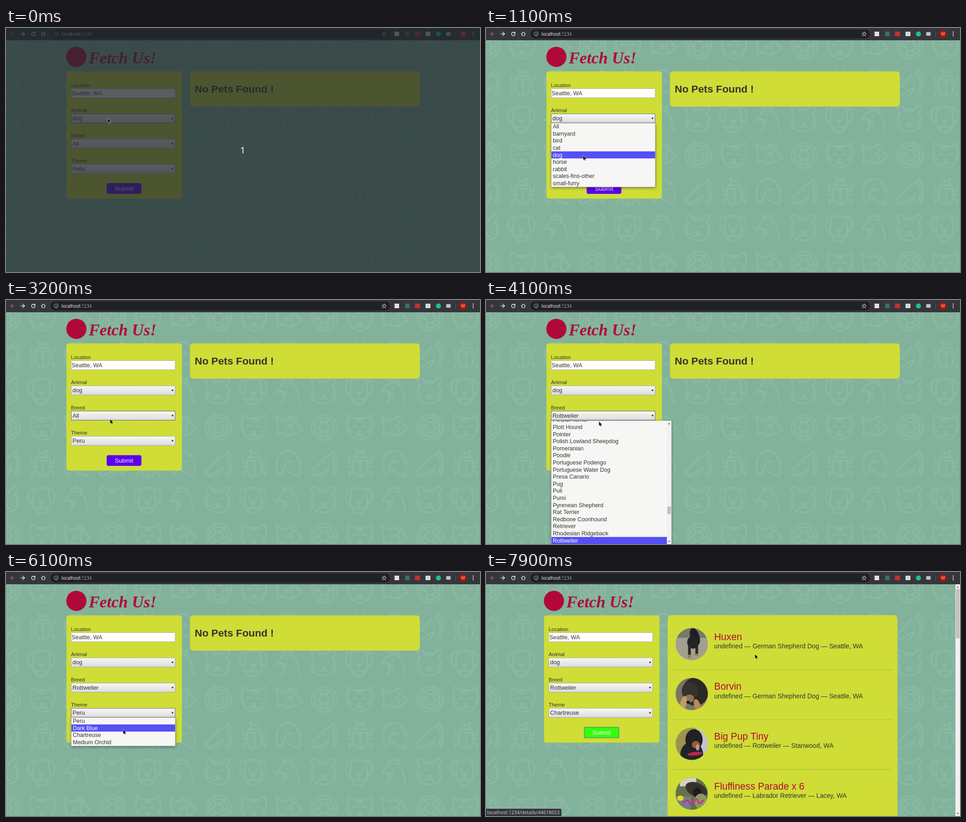
An HTML page with a canvas for the animation above (8000 ms loop, 1043 by 537 pixels).

```html
<!DOCTYPE html>
<html lang="en">
<head>
<meta charset="utf-8">
<title>Pet search</title>
<style>
html, body { margin: 0; width: 100%; height: 100%; overflow: hidden; background: #82b29b; }
canvas { display: block; width: 100vw; height: 100vh; }
</style>
</head>
<body>
<canvas id="stage"></canvas>
<script>
const W = 1043, H = 537, LOOP = 8000, STEP = 100, ROW = 15.6;
const SANS = '"Liberation Sans", Arial, sans-serif';
const UI = '"Noto Sans", "Open Sans", sans-serif';
const INK = '#333', LIME = '#cfdd36', CRIMSON = '#b20838', PICK = '#5450f5';

const canvas = document.getElementById('stage');
const dpr = window.devicePixelRatio || 1;
canvas.width = W * dpr;
canvas.height = H * dpr;
let c = canvas.getContext('2d');

function rect(x, y, w, h, fill, r = 0) {
  c.beginPath();
  c.roundRect(x, y, w, h, r);
  c.fillStyle = fill;
  c.fill();
}

function disc(x, y, r, fill) {
  c.beginPath();
  c.arc(x, y, r, 0, 7);
  c.fillStyle = fill;
  c.fill();
}

function oval(x, y, rx, ry, fill, turn = 0) {
  c.beginPath();
  c.ellipse(x, y, rx, ry, turn, 0, 7);
  c.fillStyle = fill;
  c.fill();
}

function frame(x, y, w, h, color, lw = 1) {
  c.strokeStyle = color;
  c.lineWidth = lw;
  c.strokeRect(x, y, w, h);
}

function line(d, color, lw, x = 0, y = 0) {
  c.save();
  c.translate(x, y);
  c.strokeStyle = color;
  c.lineWidth = lw;
  c.lineCap = c.lineJoin = 'round';
  c.stroke(new Path2D(d));
  c.restore();
}

function shape(d, fill, x = 0, y = 0) {
  c.save();
  c.translate(x, y);
  c.fillStyle = fill;
  c.fill(new Path2D(d));
  c.restore();
}

function text(s, x, y, size, color = INK, opt = {}) {
  c.font = `${opt.style || ''} ${size}px ${opt.font || SANS}`;
  c.textAlign = opt.align || 'left';
  c.fillStyle = color;
  c.fillText(s, x, y);
}

// Wallpaper: three rows of three line icons, repeated.
const ring = r => `M${r} 0A${r} ${r} 0 1 1 ${-r} 0A${r} ${r} 0 1 1 ${r} 0`;
const spokes = Array.from({ length: 6 }, (_, i) => {
  const p = (a, r) => `${r * Math.cos(a)} ${r * Math.sin(a)}`;
  const a = i * Math.PI / 3;
  return `M${p(a, 12)}L${p(a + Math.PI / 3, 12)}M${p(a, 12)}L${p(a, 21)}`;
}).join('');
const ICONS = [
  [2, 40, ring(28) + ring(21) + spokes],
  [80, 40, 'M-25-27L-12-19Q0-22 12-19L25-27Q28-8 26 6Q20 26 0 28Q-20 26-26 6Q-28-8-25-27ZM-14-2q4-4 8 0M6-2q4-4 8 0M-4 10h8l-4 5zM0 15q-5 7-10 2M0 15q5 7 10 2M-5-19v7M0-20v9M5-19v7M-26 8h8M26 8h-8'],
  [157, 40, 'M-29-24L-12-14Q8-26 28 4Q8 26-16 12L-26 18Q-22 4-29-24ZM10-14Q4 2 10 16M-8-2q5 4 0 8M0-6q5 4 0 8M18-1h1M-4-18Q6-30 16-16'],
  [2, 120, 'M20-28Q36 0 22 28M20-28L12-18Q-4-14-16 6L-28 16Q-30 24-22 28L-6 20Q4 14 10 10Q4 26-8 30M-2-4h2M18-16Q28 4 16 24'],
  [81, 120, 'M-16-8Q-16-14 0-14Q16-14 16-8L16 10Q14 28 0 29Q-14 28-16 10ZM0-6V28M-16-6H16M-10-14Q-8-24 0-24Q8-24 10-14M-5-23L-10-30M5-23L10-30M-16 0L-25-4V-14M16 0L25-4V-14M-16 8H-26M16 8H26M-14 16L-24 20V28M14 16L24 20V28'],
  [157, 120, 'M22 28Q34-8 8-26Q-20-34-27-4Q-30 14-22 26Q-14 24-12 8Q0 22 22 28ZM-12 8Q-6-8 8-4M-6-14h1'],
  [0, 200, 'M-20-14Q-30-20-24-28Q-14-30-10-20Q0-24 10-20Q14-30 24-28Q30-20 20-14Q32 8 22 20Q0 36-22 20Q-32 8-20-14ZM-10-4h1M10-4h1M-4 8h8l-4 5zM0 13q-6 8-10 2M0 13q6 8 10 2M-27 6h8M27 6h-8M-26 13h7M26 13h-7M0-21v8M-6-20v5M6-20v5'],
  [78, 200, 'M-14-24Q0-30 14-24L26-22Q32-6 26 6L18 4Q22 16 14 20Q10 30 0 30Q-10 30-14 20Q-22 16-18 4L-26 6Q-32-6-26-22ZM-18 4Q-20-10-14-24M18 4Q20-10 14-24M-8-6h1M8-6h1M-5 4h10l-5 6zM0 10v6q-8 6-12 0M0 16q8 6 12 0'],
  [154, 200, 'M-14 28Q-2 10-12 0L-26 4L-14-12Q-8-20 4-18Q22-14 26 28M-8-18L-12-26L-4-24L0-30L5-24L12-28L12-16M-2-8h1M-12 2q0 12 6 12q6-2 2-12']
];

function wallpaper() {
  rect(0, 0, W, H, '#82b29b');
  for (const [x, y, d] of ICONS)
    for (let i = 0; i < 5; i++)
      for (let j = 0; j < 3; j++) line(d, '#8ab8a2', 4, x + i * 232.8, y + j * 240);
}

function browserBar() {
  rect(0, 0, W, 27, '#35363a');
  rect(98, 3, 747, 20, '#202124', 10);
  const arrow = 'M4 0H-4M0-4L-4 0L0 4';
  line(arrow, '#74767a', 1.3, 14, 13);
  line('M-4 0H4M0-4L4 0L0 4', '#e8eaed', 1.3, 37, 13);
  line('M3-2.5A4 4 0 1 0 4 1', '#e8eaed', 1.3, 60, 13);
  shape('M4.5-5V-.5H0Z', '#e8eaed', 60, 13);
  line('M-4.500 0L0-4L4.500 0M-3-1V4H3V-1', '#e8eaed', 1.2, 82, 13);
  line(ring(4.4), '#c6c8cb', 1, 110.5, 13);
  line('M0-2v.1M0 0v2.200', '#c6c8cb', 1.1, 110.5, 13);
  text('localhost', 122, 16.700, 9.9, '#f1f3f4', { font: UI });
  text(':1234', 163.5, 16.700, 9.9, '#9aa0a6', { font: UI });
  line('M0-4.700L1.400-1.500L4.800-1.200L2.200 1L3 4.400L0 2.600L-3 4.400L-2.200 1L-4.800-1.200L-1.400-1.500Z', '#dadce0', 1, 832, 13);
  rect(855, 8, 10, 10, '#e9e2dc');
  rect(878, 8, 10, 10, '#3d6f66');
  rect(900, 8, 11, 10, '#c9302c');
  rect(923, 8, 11, 10, '#d5d7d8', 1.5);
  disc(951.5, 13, 5.5, '#15c39a');
  rect(968.5, 9, 10, 8, '#bcc0c4', 1.5);
  rect(989, 7, 1, 12, '#5f6368');
  disc(1005.5, 13, 7.8, '#c01208');
  text('M', 1005.5, 16.200, 8.5, '#f6dcda', { font: UI, align: 'center' });
  for (const y of [9, 13, 17]) disc(1028, y, 1.2, '#e8eaed');
}

// The wallpaper and the bar never change, so they are drawn once.
const backdrop = document.createElement('canvas');
backdrop.width = canvas.width;
backdrop.height = canvas.height;
const main = c;
c = backdrop.getContext('2d');
c.scale(dpr, dpr);
wallpaper();
browserBar();
c = main;

const ANIMALS = ['All', 'barnyard', 'bird', 'cat', 'dog', 'horse', 'rabbit', 'scales-fins-other', 'small-furry'];
const THEMES = ['Peru', 'Dark Blue', 'Chartreuse', 'Medium Orchid'];
const FIRST = ['All', 'Affenpinscher', 'Afghan Hound', 'Airedale Terrier', 'Akbash', 'Akita', 'Alaskan Malamute',
  'American Bulldog', 'American Bully', 'American Eskimo Dog', 'American Foxhound', 'American Hairless Terrier',
  'American Staffordshire Terrier', 'American Water Spaniel', 'Anatolian Shepherd', 'Appenzell Mountain Dog',
  'Aussiedoodle', 'Australian Cattle Dog'];
const LATER = ['Pekingese', 'Peruvian Inca Orchid', 'Petit Basset Griffon Vendeen', 'Pharaoh Hound',
  'Pit Bull Terrier', 'Plott Hound', 'Pointer', 'Polish Lowland Sheepdog', 'Pomeranian', 'Poodle',
  'Portuguese Podengo', 'Portuguese Water Dog', 'Presa Canario', 'Pug', 'Puli', 'Pumi', 'Pyrenean Shepherd',
  'Rat Terrier', 'Redbone Coonhound', 'Retriever', 'Rhodesian Ridgeback', 'Rottweiler'];
const PETS = [
  ['Huxen', 'German Shepherd Dog — Seattle, WA'],
  ['Borvin', 'German Shepherd Dog — Seattle, WA'],
  ['Big Pup Tiny', 'Rottweiler — Stanwood, WA'],
  ['Fluffiness Parade x 6', 'Labrador Retriever — Lacey, WA']
];

// time, x, y of the pointer tip
const PATH = [
  [0, 224, 199], [100, 226.5, 197], [600, 226.5, 197], [700, 220, 240], [800, 215, 291], [900, 215, 291],
  [1000, 214, 285], [1100, 214, 281], [1400, 214, 281], [1500, 216, 277], [1900, 228, 264], [2200, 228, 264],
  [2300, 228.5, 263.5], [3100, 228.5, 263.5], [3200, 229.3, 262.5], [3700, 229.3, 262.5], [4100, 248.7, 267.5],
  [5300, 248.7, 267.5], [5600, 256, 305], [5800, 257, 312], [6100, 257.8, 347], [6200, 259, 356],
  [6900, 259, 356], [7000, 268, 348], [7100, 268, 348], [7200, 400, 318], [7300, 521, 283], [7400, 521, 283], [7900, 592, 181]
];

function pointerAt(t) {
  const i = PATH.findIndex(k => k[0] > t);
  if (i < 0) return PATH[PATH.length - 1].slice(1);
  const [t0, x0, y0] = PATH[i - 1], [t1, x1, y1] = PATH[i];
  const k = (t - t0) / (t1 - t0);
  return [x0 + (x1 - x0) * k, y0 + (y1 - y0) * k];
}

const within = (t, a, b) => t >= a && t < b;

function pointer(x, y) {
  const d = 'M0 0V9.500L2.200 7.500L3.800 10.800L5.300 10.100L3.800 7H6.700Z';
  line(d, 'rgba(255,255,255,.75)', 1.2, x, y);
  shape(d, '#111', x, y);
}

function select(label, value, y, dark) {
  text(label, 143, y - 3.5, 11.5);
  const g = c.createLinearGradient(0, y, 0, y + 21);
  g.addColorStop(0, '#f8f8f8');
  g.addColorStop(1, '#dcdcdc');
  rect(143, y, 229.5, 21, g);
  frame(143.5, y + .5, 228.5, 20, dark ? '#66666e' : '#a5a69b');
  text(value, 146.3, y + 14.600, 12.9);
  shape('M-2.400-1.600H2.400L0 2.200Z', '#222', 366.3, y + 10.5);
}

function button(green, focused) {
  rect(221.5, 341.5, 76.5, 23.5, green ? '#36ff0a' : '#5c00f0', focused ? 0 : 4);
  if (focused) frame(221.7, 341.7, 76, 23.2, '#5b8792', 1.3);
  text('Submit', 259.8, 357.5, 13, '#f3efff', { align: 'center' });
}

function popup(items, top, x1, bottom, picked, firstY = top) {
  c.save();
  c.shadowColor = 'rgba(0,0,0,.45)';
  c.shadowBlur = 6 * dpr;
  c.shadowOffsetY = 2 * dpr;
  rect(143.5, top, x1 - 143.5, bottom - top, '#f6f6f4');
  c.restore();
  c.save();
  c.beginPath();
  c.rect(143.5, top, x1 - 143.5, bottom - top);
  c.clip();
  items.forEach((s, i) => {
    const y = firstY + i * ROW;
    if (i === picked) rect(144, y, x1 - 144, ROW, PICK);
    text(s, 147, y + 12.1, 12.5, i === picked ? '#fff' : INK);
  });
  c.restore();
  frame(143.5, top + .5, x1 - 143.5, bottom - top - .5, '#a2a3a0', .8);
}

function scrollbar(x, top, bottom, thumbY, thumbH) {
  rect(x, top, 10, bottom - top, '#f1f1f1');
  rect(x + 1, thumbY, 8, thumbH, '#c1c1c1');
  shape('M-2.500 1.300H2.500L0-1.500Z', '#555', x + 5, top + 6);
  shape('M-2.500-1.300H2.500L0 1.500Z', '#555', x + 5, bottom - 5.5);
}

function breedPopup(t) {
  if (t < 3800) {
    popup(FIRST, 265, 408, 540, 0);
    scrollbar(398, 266, H, 277, 17);
    return;
  }
  const picked = t < 3900 ? LATER.indexOf('Rat Terrier') : LATER.length - 1;
  popup(LATER, 265, 408, 540, picked, 521.5 - picked * ROW);
  scrollbar(398, 266, H, t < 3900 ? 449 : 454.5, 16.5);
}

// Simple tonal shapes inside each round picture.
const PHOTOS = [
  () => {
    rect(-36, -36, 72, 72, '#a29f92');
    rect(-36, -36, 72, 22, '#77776b');
    oval(7, -16, 10, 20, '#1f1f20', -.3);
    oval(3, -4, 13, 14, '#242324');
    rect(-8, 0, 6, 27, '#2b2827', 3);
    rect(8, 0, 6, 24, '#2b2827', 3);
    oval(-5, 27, 4, 4, '#a47d50');
    oval(11, 24, 4, 3, '#a47d50');
  },
  () => {
    rect(-36, -36, 72, 72, '#777468');
    oval(8, -5, 29, 31, '#2b2826');
    oval(-4, -7, 18, 19, '#38322d');
    oval(-5, 10, 10, 9, '#8c7560');
    oval(-18, 20, 7, 16, '#c59a62', .2);
    oval(12, 25, 7, 14, '#b98a55', -.3);
    oval(-8, 18, 4, 3, '#171718');
  },
  () => {
    rect(-36, -36, 72, 72, '#9a9450');
    rect(10, -36, 26, 72, '#c5c3cf');
    oval(0, 23, 25, 27, '#20252a');
    oval(5, -9, 19, 23, '#202124');
    oval(9, 2, 9, 8, '#8d613c');
    oval(13, 8, 4, 7, '#d985a0');
    oval(7, 22, 16, 4, '#bd2944', -.1);
  },
  () => {
    rect(-36, -36, 72, 72, '#65704b');
    rect(-26, -36, 36, 20, '#d5d1bd');
    oval(10, -9, 25, 15, '#36332d', .4);
    oval(12, -2, 9, 11, '#1d1c1c');
    rect(-36, 6, 34, 30, '#747f85');
    oval(20, 17, 14, 17, '#8b9a5a');
    oval(-25, 10, 7, 6, '#e3d526');
    line('M-18 20Q-8 10-6 19T4 18T14 17T25 15', '#cf20b4', 3);
  }
];

function results() {
  rect(405, 95, 505.5, 460, LIME, 8);
  PETS.forEach(([name, info], i) => {
    const y = 158.700 + i * 109.700;
    c.save();
    c.translate(458, y);
    c.beginPath();
    c.arc(0, 0, 35.5, 0, 7);
    c.clip();
    PHOTOS[i]();
    c.restore();
    text(name, 507.3, y - 9.2, 21.2, '#b30b2d');
    text('undefined — ' + info, 507.3, y + 9.1, 14.2);
    rect(415.5, y + 56, 484, 1, '#adba38');
  });
}

function statusBar() {
  rect(-4, 521, 170, 20, '#35363a', 3);
  text('localhost:1234/details/44618653', 2.5, 533, 10.5, '#c9ccd0', { font: UI });
}

function draw(t) {
  const [px, py] = pointerAt(t);
  const found = t >= 7500, green = t >= 6600;
  c.setTransform(1, 0, 0, 1, 0, 0);
  c.drawImage(backdrop, 0, 0);
  c.scale(dpr, dpr);

  c.save();
  if (found) c.translate(-5.3, 0);
  disc(154.8, 63.5, 22.2, CRIMSON);
  text('Fetch Us!', 182, 77.5, 36, CRIMSON, { style: 'italic bold', font: '"Liberation Serif", serif' });
  rect(133, 95.5, 254, 280, LIME, 5);
  if (found) results();
  else {
    rect(405, 95.5, 505.5, 77.5, LIME, 7);
    text('No Pets Found !', 415.3, 141.5, 22.700, INK, { style: 'bold' });
  }
  text('Location', 143, 129.5, 11.5);
  rect(143, 133, 229.5, 21, '#fff');
  frame(143.5, 133.5, 228.5, 20, '#b3b6a0');
  text('Seattle, WA', 144.5, 147.5, 12.9);
  const breed = t < 3800 ? 'All' : t < 3900 ? 'Rat Terrier' : 'Rottweiler';
  select('Animal', 'dog', 188.5, t < 1500);
  select('Breed', breed, 244, within(t, 1900, 4800));
  select('Theme', green ? 'Chartreuse' : 'Peru', 299.5, within(t, 5600, 7000));
  button(green, t >= 7000);
  c.restore();

  if (within(t, 400, 1300)) {
    const over = Math.floor((py - 209) / ROW);
    popup(ANIMALS, 209, 372.5, 350, over < 0 ? 4 : over);
  }
  if (within(t, 3400, 4800)) breedPopup(t);
  if (within(t, 5800, 6600)) {
    const over = Math.floor((py - 320) / ROW);
    popup(THEMES, 320, 372.5, 383, Math.max(0, over));
  }
  if (found) {
    scrollbar(1033, 27, H, 37.5, 108.5);
    if (t >= 7700) statusBar();
  }
  if (t < 100) {
    rect(0, 0, W, H, 'rgba(33,40,46,.75)');
    text('1', 521, 276, 20, '#fff', { font: UI, align: 'center' });
  }
  pointer(px, py);
}

let start;
function tick(now) {
  start ??= now;
  const t = (now - start) % LOOP;
  draw(Math.floor(t / STEP) * STEP);
  requestAnimationFrame(tick);
}
requestAnimationFrame(tick);
</script>
</body>
</html>
```
